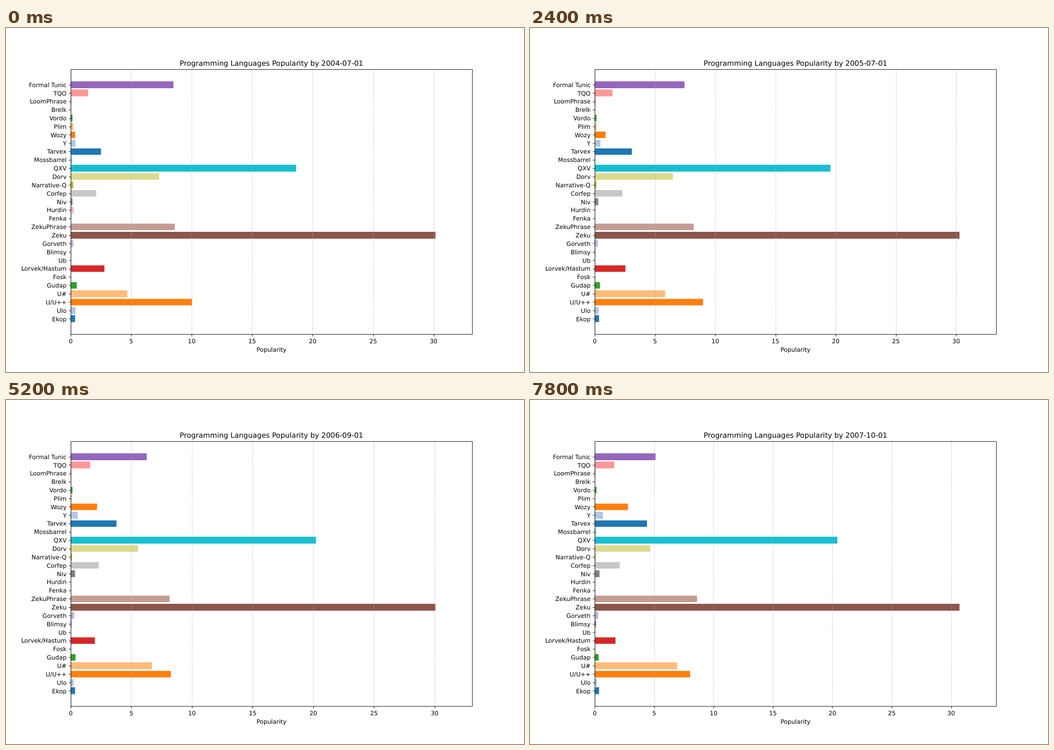
These frames come from a looping animation (917 px wide and 611 px high, 8000 ms). An HTML page:

```html
<!DOCTYPE html>
<html lang="en">
<head>
<meta charset="utf-8">
<title>Programming Languages Popularity</title>
<style>
  html, body { margin: 0; width: 100%; height: 100%; overflow: hidden; background: #fff; }
  svg { display: block; width: 100vw; height: 100vh; }
  text { font: 13.89px "DejaVu Sans", sans-serif; text-rendering: geometricPrecision; }
  .title { font-size: 16.67px; }
  .middle { text-anchor: middle; }
  .end { text-anchor: end; }
  .axis { fill: none; stroke: #000; stroke-width: 1.11; }
  .grid { stroke: #b0b0b0; stroke-opacity: .7; stroke-width: 1.11; stroke-dasharray: 4.11 1.78; }
</style>
</head>
<body>
<svg id="chart" viewBox="0 0 1200 800" preserveAspectRatio="none"></svg>
<script>
const STEP_MS = 200, STEPS = 40;
const LEFT = 150, RIGHT = 1080, TOP = 96, BOTTOM = 712;
const TICK = 4.86, MARGIN = 1.1, BAR = 0.8;

const COLORS = ['#1f77b4', '#aec7e8', '#ff7f0e', '#ffbb78', '#2ca02c', '#98df8a', '#d62728',
  '#ff9896', '#9467bd', '#c5b0d5', '#8c564b', '#c49c94', '#e377c2', '#f7b6d2', '#7f7f7f',
  '#c7c7c7', '#bcbd22', '#dbdb8d', '#17becf', '#9edae5'];

// Trends: functions of u, which runs from 0 to 1 over the loop.
const eased = ease => (from, to) => u => from + (to - from) * ease(u);
const steady = value => () => value;
const linear = eased(u => u);
const slowing = eased(u => 1 - (1 - u) ** 2);
const sudden = eased(u => 1 - 2 ** (-20 * u));
const smooth = eased(u => u * u * (3 - 2 * u));
const arc = eased(u => Math.sin(Math.PI * u));  // out to the second value and back
const through = points => u => {
  const month = u * (STEPS - 1);
  const i = Math.max(1, points.findIndex(point => point[0] >= month));
  const [[m0, v0], [m1, v1]] = [points[i - 1], points[i]];
  return v0 + (v1 - v0) * (month - m0) / (m1 - m0);
};

// Bottom to top.
const LANGUAGES = [
  ['Ekop', steady(.35)],
  ['Ulo', linear(.38, .18)],
  ['U/U++', slowing(10.01, 8.03)],
  ['U#', slowing(4.67, 6.94)],
  ['Gudap', linear(.49, .34)],
  ['Fosk', steady(0)],
  ['Lorvek/Hastum', smooth(2.8, 1.73)],
  ['Ub', steady(0)],
  ['Blimsy', slowing(0, .1)],
  ['Gorveth', slowing(.2, .3)],
  ['Zeku', through([[0, 30.17], [2, 29.08], [5, 29.69], [12, 30.29], [19, 29.75], [39, 30.72]])],
  ['ZekuPhrase', arc(8.6, 8.1)],
  ['Fenka', steady(0)],
  ['Hurdin', sudden(.25, 0)],
  ['Niv', slowing(.14, .4)],
  ['Corfep', arc(2.1, 2.35)],
  ['Narrative-Q', linear(.2, .07)],
  ['Dorv', linear(7.3, 4.7)],
  ['QXV', slowing(18.62, 20.42)],
  ['Mossbarrel', arc(.13, 0)],
  ['Tarvex', linear(2.49, 4.4)],
  ['Y', linear(.38, .68)],
  ['Wozy', smooth(.34, 2.8)],
  ['Plim', linear(.22, 0)],
  ['Vordo', steady(.13)],
  ['Brelk', steady(0)],
  ['LoomPhrase', steady(.03)],
  ['TQO', smooth(1.43, 1.64)],
  ['Formal Tunic', linear(8.49, 5.13)],
];

const count = LANGUAGES.length;
const pitch = (BOTTOM - TOP) / ((count - 1 + BAR) * MARGIN);
const firstRow = BOTTOM - pitch * (BAR / 2 + (count - 1 + BAR) * (MARGIN - 1) / 2);

const snap = x => Math.round(x) + .5;  // puts a thin line on a whole pixel
const text = (x, y, content, style) => `<text x="${x}" y="${y}" class="${style}">${content}</text>`;
const path = (d, style) => `<path d="${d}" class="${style}"/>`;

function dateLabel(month) {
  const total = 6 + month;
  const year = 2004 + Math.floor(total / 12);
  return `${year}-${String(total % 12 + 1).padStart(2, '0')}-01`;
}

function render(month) {
  const values = LANGUAGES.map(([, trend]) => trend(month / (STEPS - 1)));
  const limit = Math.max(...values) * MARGIN;
  const xOf = value => LEFT + value / limit * (RIGHT - LEFT);
  const center = (LEFT + RIGHT) / 2;
  let bars = '', grid = '', axes = '';

  LANGUAGES.forEach(([name], i) => {
    const y = firstRow - i * pitch;
    const top = Math.round(y - pitch * BAR / 2);
    const height = Math.round(y + pitch * BAR / 2) - top;
    const width = Math.round(xOf(values[i])) - LEFT;
    bars += `<rect x="${LEFT}" y="${top}" width="${width}" height="${height}" fill="${COLORS[i % COLORS.length]}"/>`;
    axes += path(`M${snap(LEFT)} ${snap(y)}h${-TICK}`, 'axis')
      + text(LEFT - 2 * TICK, y + 5.3, name, 'end');
  });

  for (let tick = 0; tick <= limit; tick += 5) {
    const x = snap(xOf(tick));
    grid += path(`M${x} ${snap(BOTTOM)}V${snap(TOP)}`, 'grid');
    axes += path(`M${x} ${snap(BOTTOM)}v${TICK}`, 'axis') + text(xOf(tick), 733, tick, 'middle');
  }

  axes += path(`M${snap(LEFT)} ${snap(TOP)}H${snap(RIGHT)}V${snap(BOTTOM)}H${snap(LEFT)}Z`, 'axis')
    + text(center, 752.5, 'Popularity', 'middle')
    + text(center, 88, `Programming Languages Popularity by ${dateLabel(month)}`, 'title middle');

  document.getElementById('chart').innerHTML = bars + grid + axes;
}

let shown = -1;
const start = performance.now();
function tick(now) {
  const month = Math.floor(Math.max(0, now - start) / STEP_MS) % STEPS;
  if (month !== shown) render(shown = month);
  requestAnimationFrame(tick);
}
tick(start);
</script>
</body>
</html>
```
